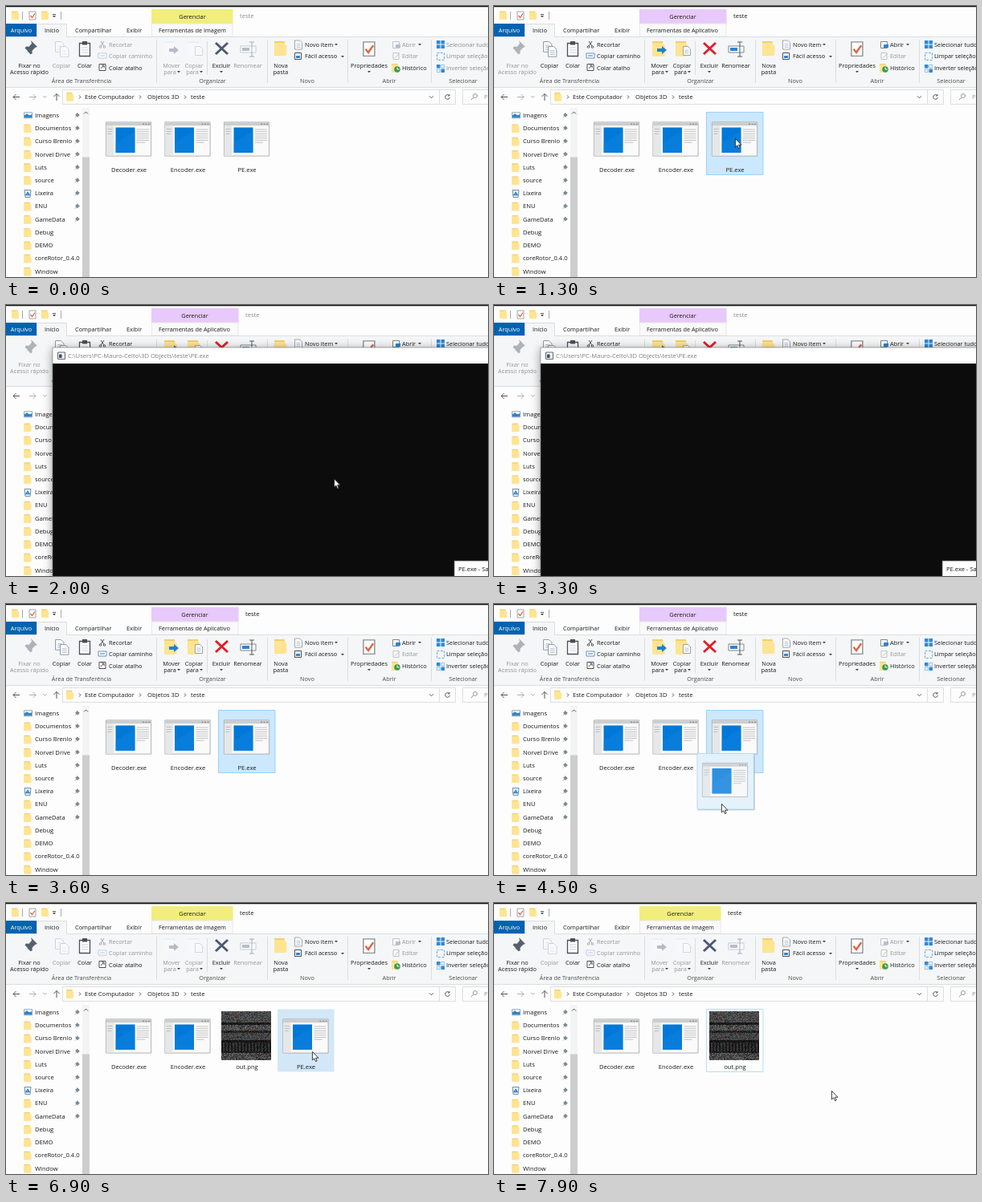
Write an HTML page with a canvas that moves like this. It is 600 px wide and 338 px high and loops after 8 s.

```html
<!DOCTYPE html>
<html lang="pt-BR">
<head>
<meta charset="utf-8">
<title>Explorador</title>
<style>
html, body { margin: 0; width: 100%; height: 100%; overflow: hidden; background: #fdfdfd; }
#stage { position: relative; width: 600px; height: 338px; overflow: hidden; }
svg, canvas { position: absolute; left: 0; top: 0; }
#noise { left: 268px; top: 135px; width: 62px; height: 61px; }
text { font: 7.35px "Open Sans", "Noto Sans", sans-serif; fill: #1a1a1a; white-space: pre; }
.big { font-size: 7.6px; }
.mid { text-anchor: middle; }
.label { fill: #4c4c4c; text-anchor: middle; }
.off { fill: #969696; }
.ink { fill: var(--ink); }
.fix { fill: var(--fix); }
.dim { opacity: var(--dim); filter: var(--tone); }
.line { fill: none; stroke: #555; stroke-width: 1; }
.sep { stroke: #dcdddf; }

#win { animation: mode 8s step-end infinite; }
@keyframes mode {
  0%, 82.5%, 93.75%, 100% {
    --ink: #969696; --dim: .5; --tone: grayscale(1) sepia(.6) hue-rotate(180deg);
    --fix: #1a1a1a; --fixdim: 1; --img: 1; --app: 0; --shift: 0px; --cross: #4d5a75;
  }
  12.5%, 87.5% {
    --ink: #1a1a1a; --dim: 1; --tone: none;
    --fix: #969696; --fixdim: .45; --img: 0; --app: 1; --shift: 7px; --cross: #e0202b;
  }
}
.img { opacity: var(--img); }
.app { opacity: var(--app); }
#title { transform: translateX(var(--shift)); animation: title 8s step-end infinite; }
@keyframes title {
  0%, 18.75% { fill: #8c8c8c; }
  12.5%, 43.75%, 100% { fill: #1a1a1a; }
}
#choose text { animation: choose 8s step-end infinite; }
@keyframes choose { 0% { fill: #8c8c8c; } 12.5%, 100% { fill: #1a1a1a; } }

.cell { fill: none; stroke: none; }
#pe3 { animation: early 8s step-end infinite; }
#out, #noise { animation: late 8s step-end infinite; }
#pe4 { animation: spell 8s step-end infinite; }
@keyframes early { 0% { opacity: 1; } 73.75%, 100% { opacity: 0; } }
@keyframes late { 0% { opacity: 0; } 73.75%, 100% { opacity: 1; } }
@keyframes spell { 0%, 93.75%, 100% { opacity: 0; } 73.75% { opacity: 1; } }
#pe3 .cell { animation: mark3 8s step-end infinite; }
@keyframes mark3 {
  0% { fill: none; stroke: none; }
  10% { fill: #e5f3ff; stroke: none; }
  12.5%, 100% { fill: #cce8ff; stroke: #99d1ff; }
}
#pe4 .cell { animation: mark4 8s step-end infinite; }
@keyframes mark4 {
  0%, 87.5%, 100% { fill: #cce8ff; stroke: #99d1ff; }
  82.5% { fill: none; stroke: none; }
  85% { fill: #d2e7f8; stroke: none; }
}
#enc .cell { animation: hover 8s step-end infinite; }
@keyframes hover { 0%, 67.5%, 100% { fill: none; } 62.5% { fill: #e5f3ff; } }
#out .cell { animation: focus 8s step-end infinite; }
@keyframes focus { 0% { stroke: none; } 93.75%, 100% { stroke: #b4dff0; } }

#console, #dialog { animation: popup 8s linear infinite; transform-origin: 470px 320px; }
#console { filter: drop-shadow(0 2px 6px #0006); }
@keyframes popup {
  0%, 18.75% { opacity: 0; transform: scale(.97); }
  20% { opacity: .84; transform: scale(.995); }
  22.5%, 42.5% { opacity: 1; transform: none; }
  45%, 100% { opacity: 0; transform: scale(.97); }
}
#cursor { animation: move 8s ease-in-out infinite; }
@keyframes move {
  0%, 3.75% { transform: translate(612px, 250px); }
  11.25%, 16.25% { transform: translate(300px, 165px); }
  18.75%, 23.75% { transform: translate(403px, 213px); }
  33.75% { transform: translate(563px, 318px); }
  36.25% { transform: translate(602px, 345px); }
  45% { transform: translate(602px, 320px); }
  51.875%, 53.125% { transform: translate(295px, 196px); }
  56.25% { transform: translate(283px, 249px); }
  65%, 66.25% { transform: translate(225px, 193px); }
  68.75% { transform: translate(209px, 208px); }
  73.75% { transform: translate(300px, 256px); }
  78.75% { transform: translate(415px, 245px); }
  81.25% { transform: translate(408px, 261px); }
  86.25%, 90% { transform: translate(381px, 185px); }
  96.25%, 100% { transform: translate(420px, 234px); }
}
#ghost { animation: drag 8s step-end infinite; }
@keyframes drag { 0%, 65%, 100% { opacity: 0; } 53.125% { opacity: 1; } }
</style>
</head>
<body>
<div id="stage">
<svg id="win" width="600" height="338">
  <defs>
    <g id="folder"><path fill="#f1cf6e" d="M0 0h7.500v10.500H0z"/><path fill="#ffe491" d="M0 1.200h6.800l2.200 1.800v7.500H0z"/></g>
    <g id="page"><path fill="#fff" stroke="#8a8f96" stroke-width=".8" d="M.5.5h6l3 3v8h-9z"/><path stroke="#9db7d3" stroke-width=".8" d="M2.500 5h5M2.500 7h5M2.500 9h5"/></g>
    <g id="checked"><path fill="#fff" stroke="#8a8f96" stroke-width=".8" d="M.5.5h8v10h-8z"/><path fill="none" stroke="#e0603c" stroke-width="1.300" d="M2 5.500l2 2.500 3.500-5"/></g>
    <path id="drop" fill="#444" d="M0 0h4l-2 2.200z"/>
    <path id="chev" class="line" stroke-width="1.200" d="M0 0l1.900 2L0 4"/>
    <path id="pin" fill="#7d8790" d="M3.500 0L7 3.500 5.600 4 4.600 6 3 4.800.3 7.200 2.400 4.200 1 2.600 3 1.500z"/>
    <g id="thumb">
      <path fill="#fafafa" stroke="#a0a0a0" stroke-width=".8" d="M.4.4h56.200v42.200H.4z"/>
      <path fill="#cbcdcf" d="M.8.8h55.400v4H.8z"/>
      <path stroke="#666" stroke-width=".8" d="M46 2.800h2M49.500 2.800h2M53 2.800h2"/>
      <path fill="#e6e7e8" d="M.8 4.800h9.500v37.400H.8z"/>
      <path stroke="#b4b4b4" stroke-width=".8" d="M2.500 9h6M2.500 12h6M2.500 15h5M39 9.500h15M39 12.200h15M39 14.900h15M39 17.600h15M39 20.300h15M39 23h15M39 25.700h10"/>
      <path fill="#0078d7" d="M12.500 7h24v31.500h-24z"/><path fill="#1485e2" d="M12.500 26L36.500 11v27.500h-24z" opacity=".4"/>
    </g>
  </defs>

  <path fill="#fdfdfd" d="M0 0h600v338H0z"/>
  <path fill="#111" d="M0 0h600v1.200H0z"/>
  <use href="#folder" x="7" y="6.500"/>
  <path class="line" stroke-width=".7" opacity=".5" d="M20.500 7v10M68.500 7v10"/>
  <use href="#checked" x="28.500" y="6.500"/><use href="#folder" x="44" y="6.500"/>
  <path class="line" d="M58 10.500h4"/><use href="#drop" x="58" y="12"/>
  <g class="img">
    <path fill="#f1ee7d" d="M181 4h101.500v18H181z"/><path fill="#fafafa" stroke="#e8e8e8" d="M181.500 22h100.500v16H181.500z"/>
    <text class="mid" x="232" y="15.600">Gerenciar</text><text x="190" y="32.600">Ferramentas de Imagem</text>
  </g>
  <g class="app">
    <path fill="#e7c9fb" d="M181 4h108.500v18H181z"/><path fill="#fafafa" stroke="#e8e8e8" d="M181.500 22h107.500v16H181.500z"/>
    <text class="mid" x="235" y="15.600">Gerenciar</text><text x="190" y="32.600">Ferramentas de Aplicativo</text>
  </g>
  <text id="title" class="big" x="291" y="14.800">teste</text>
  <path fill="#0063b1" d="M0 22h38v16H0z"/>
  <text class="mid" x="19" y="32.600" style="fill:#fff">Arquivo</text>
  <path fill="#f5f6f7" d="M0 38h600v63H0z"/>
  <path class="sep" fill="#f5f6f7" d="M0 38.500h38.500V22.500h37v16H600"/>
  <text class="mid" x="57" y="32.600">Início</text>
  <text x="86" y="32.600">Compartilhar</text><text x="150" y="32.600">Exibir</text>
  <path class="sep" d="M0 101.500h600M187.500 42v54M325.500 42v54M425.500 42v54M529.500 42v54M250.500 44v42"/>

  <g style="opacity:var(--fixdim)"><path fill="#56616d" d="M31 43l8 8-2.500.8-4 4 .2 3.500-2.200 1-3.700-3.700L22 63l5-7-3.500-3.500 1.500-2 3.600.3 3.400-4z"/></g>
  <g class="dim"><use href="#page" transform="translate(61 44) scale(1.150)"/><use href="#page" transform="translate(67 50) scale(1.150)"/></g>
  <path fill="#fff" stroke="#4a4f57" stroke-width="1.300" d="M91.500 46.500h13v16h-13z"/><path fill="#4a4f57" d="M95 44h6v4.500h-6z"/><path stroke="#b9c3ce" stroke-width=".8" d="M94 52h8M94 55h8M94 58h8"/>
  <g class="dim"><path class="line" stroke="#31679f" d="M118 44l4 6M122 44l-4 6"/><circle class="line" cx="117.500" cy="51" r="1.300"/><circle class="line" cx="122.500" cy="51" r="1.300"/>
    <path fill="#fff" stroke="#3b77b3" stroke-width=".8" d="M115 59h10v6h-10z"/><path stroke="#3b77b3" d="M117 62h6"/></g>
  <path fill="#fff" stroke="#4a4f57" d="M116 72.500h8v8h-8z"/><path class="line" d="M118 78l4-4m-3 0h3v3"/>
  <g class="dim"><use href="#folder" transform="translate(197 44) scale(1.750)"/><path fill="#1d80d6" d="M203 53h6v-3l6 5-6 5v-3h-6z"/>
    <use href="#folder" transform="translate(226 44) scale(1.750)"/><use href="#page" x="235" y="50"/></g>
  <path style="stroke:var(--cross)" stroke-width="3" d="M261 46l15 14M276 46l-15 14"/>
  <g class="dim"><path fill="#fff" stroke="#7a8591" d="M292 50h19v8h-19z"/><path fill="#2b83d3" d="M294 52h9v4h-9z"/><path class="line" d="M303 45h6m-3 0v18m-3 0h6"/></g>
  <use href="#folder" transform="translate(334 44) scale(1.700)"/>
  <use href="#page" x="359" y="42.500"/><path fill="#fff" stroke="#4a4f57" d="M359.500 58.500h8v8h-8z"/><path fill="#2c84d6" d="M361 62h5v3h-5z"/>
  <use href="#checked" transform="translate(444 44) scale(1.750)"/>
  <g class="dim"><path fill="#fff" stroke="#7a8591" d="M481.500 44.500h8v8h-8z"/><path fill="#2c84d6" d="M485 48h6v4h-6z"/></g>
  <g opacity=".4"><path fill="#fff" stroke="#777" d="M482 58.500h7v8h-7z"/><path stroke="#777" d="M484 65l6-6"/></g>
  <use href="#folder" x="480" y="72"/><circle cx="487" cy="79" r="3.800" fill="#3b9b4c"/><path stroke="#fff" fill="none" d="M487 76.500v2.500h2.500"/>
  <g fill="#2f8ad8"><path d="M536 43h4.500v4.500H536zM541.500 43h4.500v4.500h-4.500zM536 48.500h4.500V53H536zM541.500 48.500h4.500V53h-4.500z"/>
    <path fill="none" stroke="#6fa9da" stroke-dasharray="3 1.500" d="M536.500 58.500h9v9h-9z"/>
    <path d="M536 73h4.500v4.500H536zM541.500 78.500h4.500V83h-4.500z"/><path fill="none" stroke="#6fa9da" stroke-width=".7" d="M541.900 73.400h3.700v3.700h-3.700zM536.400 78.900h3.700v3.700h-3.700z"/></g>
  <g id="labels"></g>
  <g id="choose"><text x="548" y="50.600">Selecionar tudo</text><text x="548" y="65.400">Limpar seleção</text><text x="548" y="80.400">Inverter seleção</text></g>

  <path class="line" stroke-width="1.200" d="M17 113.500H9m3.500-3.500L9 113.500l3.500 3.500M63 118v-8.500m-3.500 3.500l3.500-3.500 3.500 3.500"/>
  <path class="line" opacity=".45" d="M29 113.500h8m-3.500-3.500l3.500 3.500-3.500 3.500M46 112l2.300 2.300L50.600 112"/>
  <path fill="none" stroke="#dedede" d="M70.500 104.500h489v18h-489zM539.500 104.500v18M568.500 104.500H601v18h-32.500z"/>
  <use href="#folder" x="75" y="108"/>
  <use href="#chev" x="91" y="111.500"/><use href="#chev" x="166" y="111.500"/><use href="#chev" x="222" y="111.500"/>
  <text class="big" x="98" y="116.200">Este Computador</text><text class="big" x="176" y="116.200">Objetos 3D</text><text class="big" x="230" y="116.200">teste</text>
  <path class="line" d="M527 112.300l2.500 2.500 2.500-2.500M551.500 111.500a2.800 2.800 0 1 0 .8 2.500M552 110v2h-2"/>
  <g opacity=".6"><circle class="line" cx="584" cy="112" r="2.500"/><path class="line" d="M582 114l-3 3"/></g>
  <text class="big off" x="595" y="116.200">Pesquisar</text>

  <g id="side"></g>
  <path fill="#f4f4f4" d="M95 127h9v211h-9z"/><path fill="#cdcdcd" d="M95 188.500h9v150h-9z"/>
  <path class="line" stroke-width="1.300" d="M97 134.500l2.500-2.500 2.500 2.500"/>
  <g id="files"></g>
</svg>
<canvas id="noise" width="62" height="61"></canvas>
<svg id="top" width="600" height="338">
  <g id="console">
    <path fill="#fff" d="M58 53h700v21H58z"/><path fill="#0c0c0c" d="M58 73h700v500H58z"/>
    <path fill="none" stroke="#777" stroke-width=".6" d="M58 573V53h700"/>
    <path fill="#f4f4f4" stroke="#666" d="M64.500 59h9v8.500h-9z"/><path fill="#2a4f7c" d="M66 61.500h3.500v4.500H66z"/>
    <text x="77" y="66" style="fill:#7b7b7b;font-size:7.600px">C:\Users\PC-Mauro-Celto\3D Objects\teste\PE.exe</text>
  </g>
  <g id="dialog">
    <path fill="#fff" stroke="#555" stroke-width=".8" d="M558 319h220v120H558z"/>
    <text class="big" x="563" y="331.500">PE.exe - Saída</text>
  </g>
  <g id="cursor">
    <g id="ghost">
      <path fill="#e4f1fb" fill-opacity=".93" stroke="#b5d9f3" d="M-30 -62.500h70.500V7H-30z"/>
      <path fill="none" stroke="#8a9299" stroke-opacity=".5" d="M-29 7.800h70.200v-69"/>
      <use href="#thumb" x="-24" y="-51" opacity=".8"/>
    </g>
    <path fill="#fff" stroke="#111" stroke-width=".8" d="M.4.400v10.600l2.400-2.200 1.700 3.900 1.700-.8-1.700-3.700h3.400z"/>
  </g>
</svg>
</div>
<script>
const $ = id => document.getElementById(id);
const fill = (id, list) => $(id).insertAdjacentHTML('beforeend', list.join(''));
const text = (x, y, s, cls = '') => `<text x="${x}" y="${y + 2.6}" class="${cls}">${s}</text>`;
const use = (id, x, y) => `<use href="#${id}" x="${x}" y="${y}"/>`;

fill('labels', [
  [29, 74, 'Fixar no', 'mid fix'], [29, 82, 'Acesso rápido', 'mid fix'],
  [69, 74, 'Copiar', 'mid ink'], [98, 74, 'Colar', 'mid'],
  [128, 48, 'Recortar', 'ink'], [128, 62.5, 'Copiar caminho', 'ink'], [128, 77, 'Colar atalho'],
  [206, 74, 'Mover', 'mid ink'], [204, 82, 'para', 'mid ink'],
  [234, 74, 'Copiar', 'mid ink'], [232, 82, 'para', 'mid ink'],
  [268, 74, 'Excluir', 'mid'], [301, 74, 'Renomear', 'mid ink'],
  [342, 74, 'Nova', 'mid'], [342, 82, 'pasta', 'mid'],
  [372, 48, 'Novo item'], [372, 62.5, 'Fácil acesso'],
  [452, 74, 'Propriedades', 'mid'], [493, 48, 'Abrir', 'ink'],
  [493, 62.5, 'Editar', 'off'], [493, 77.5, 'Histórico'],
  [94, 93, 'Área de Transferência', 'label'], [257, 93, 'Organizar', 'label'],
  [375, 93, 'Novo', 'label'], [477, 93, 'Abrir', 'label'], [569, 93, 'Selecionar', 'label']
].map(a => text(...a)));
fill('labels', [[213, 81], [241, 81], [266, 81], [409, 47], [417, 62], [450, 81], [513, 47]]
  .map(p => use('drop', ...p)));

const places = ['Imagens', 'Documentos', 'Curso Brenlo', 'Norvel Drive', 'Luts', 'source', 'Lixeira',
  'ENU', 'GameData', 'Debug', 'DEMO', 'coreRotor_0.4.0', 'Window'];
const icons = {
  Imagens: y => `<path fill="#fff" stroke="#8aa5ba" d="M22.500 ${y - 3.5}h10v7h-10z"/><path fill="#3485c4" d="M23 ${y + 3}v-3l3-2 3 2 3-1v4z"/>`,
  Lixeira: y => `<path fill="#eef5fa" stroke="#77889a" d="M23 ${y - 4}h8l-1 9h-6z"/><path fill="none" stroke="#2480cc" stroke-width="1.400" d="M25 ${y + 2}l2-3 2 3z"/>`
};
fill('side', places.map((name, i) => {
  const y = 136.3 + i * 16.22;
  return (icons[name] ? icons[name](y) : use('folder', 22.5, y - 5)) +
    text(36, y, name, 'big') + (i < 9 ? use('pin', 85, y - 3.5) : '');
}));

const cell = (id, slot, name, thumb = true) => {
  const x = 117.5 + slot * 73.5;
  return `<g id="${id}"><path class="cell" d="M${x} 132.500h70.500v78h-70.500z"/>` +
    (thumb ? use('thumb', x + 6.5, 144.5) : '') + text(x + 35.5, 204, name, 'big mid') + '</g>';
};
fill('files', [cell('dec', 0, 'Decoder.exe'), cell('enc', 1, 'Encoder.exe'), cell('pe3', 2, 'PE.exe'),
  cell('out', 2, 'out.png', false), cell('pe4', 3, 'PE.exe')]);

// Bands of seeded noise: first row, brightness, colourfulness
const bands = [[0, 72, .5], [14, 28, .2], [17, 76, .3], [24, 38, .2], [27, 68, .6],
  [36, 24, .1], [39, 52, .5], [50, 30, .1], [52, 72, .2]];
let seed = 7;
const rnd = () => (seed = seed * 16807 % 2147483647) / 2147483647;
const ctx = $('noise').getContext('2d');
for (let y = 0; y < 61; y++) {
  const [start, light, hue] = bands.filter(b => b[0] <= y).pop();
  for (let x = 0; x < 62; x++) {
    const grey = rnd(), stripe = start === 39 && x % 4 < 2 ? .5 : 1;
    const rgb = [0, 0, 0].map(() => light * stripe * (.3 + 1.4 * (grey * (1 - hue) + rnd() * hue)) | 0);
    ctx.fillStyle = `rgb(${rgb})`;
    ctx.fillRect(x, y, 1, 1);
  }
}
</script>
</body>
</html>
```
